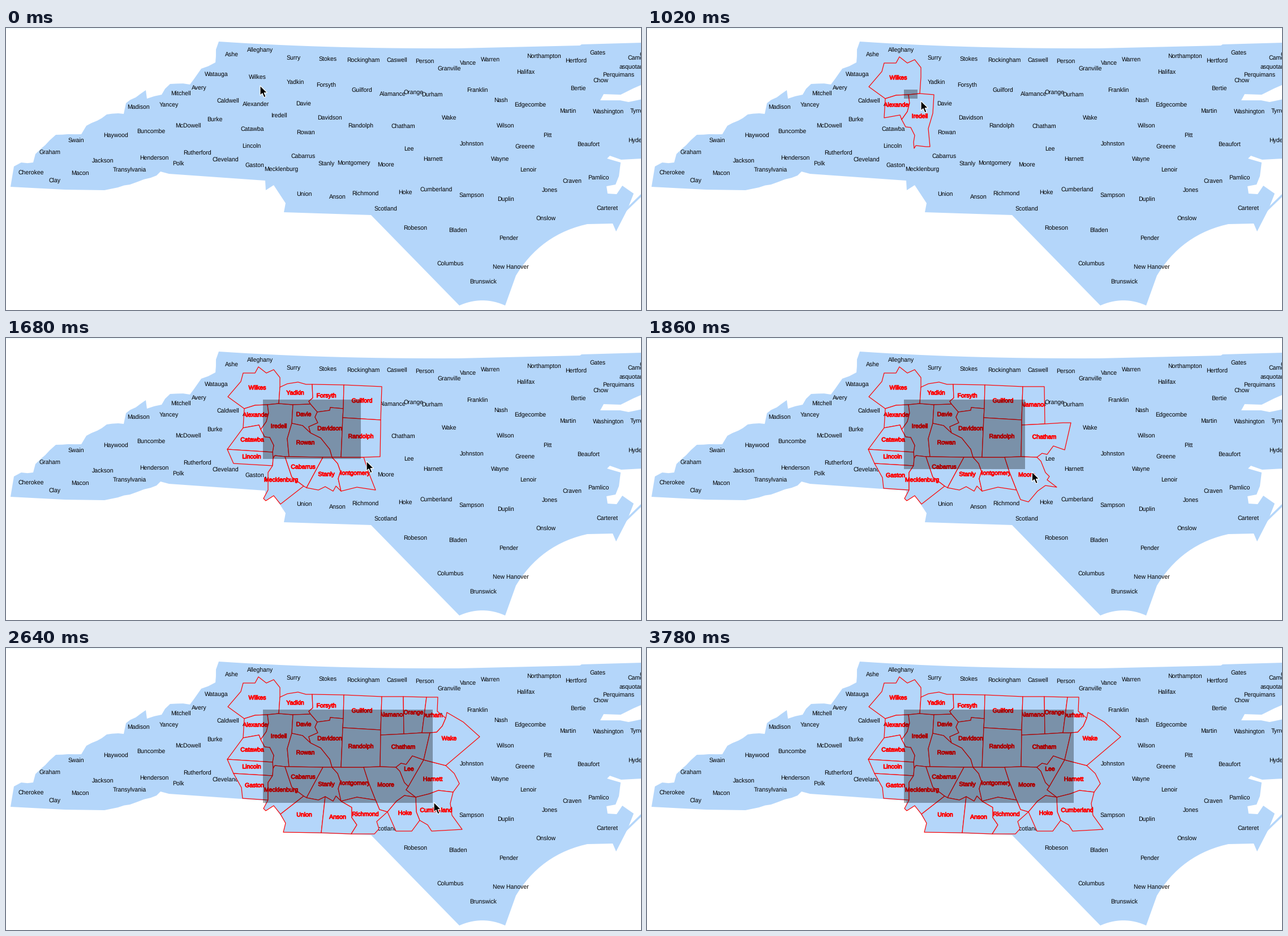
These frames come from a looping animation (1122x499 px, 3840 ms). A matplotlib script:

```python
import numpy as np
import matplotlib.pyplot as plt
from matplotlib.animation import FuncAnimation
from matplotlib.patches import Polygon, Rectangle
from matplotlib.patheffects import withStroke

W, H, DPI = 1122, 499, 64
FRAMES, STEP = 64, 60
LAND, RED = "#b4d6fa", "red"

plt.rcParams["font.family"] = "Liberation Sans"
plt.rcParams["text.hinting"] = "none"

fig = plt.figure(figsize=(W / DPI, H / DPI), dpi=DPI, facecolor="white")
ax = fig.add_axes([0, 0, 1, 1])
ax.set_xlim(0, W)
ax.set_ylim(H, 0)
ax.axis("off")


def pt(px):
    return px * 72 / DPI


def rough(points, amp, seed):
    """Break a line into short pieces and shake them, keeping its corners."""
    rng = np.random.default_rng(seed)
    out = []
    for a, b in zip(np.array(points[:-1], float), np.array(points[1:], float)):
        n = max(1, int(np.hypot(*(b - a)) // 10))
        out.append(a)
        out += [a + (b - a) * k / n + rng.uniform(-amp, amp, 2)
                for k in range(1, n)]
    return out + [points[-1]]


def bend(a, ctrl, b, n=16):
    s = np.linspace(0, 1, n)[:, None]
    a, ctrl, b = map(np.array, (a, ctrl, b))
    return list((1 - s) ** 2 * a + 2 * s * (1 - s) * ctrl + s ** 2 * b)


# State outline, clockwise from the north-west corner
north = bend((376, 24), (570, 37), (800, 36)) + [(1014, 31), (1017, 29),
                                                 (1124, 26)]
sounds = [(1124, 100), (1108, 107), (1086, 118), (1056, 117), (1050, 128),
          (1085, 128), (1100, 131), (1124, 126), (1124, 231), (1087, 233),
          (1067, 226), (1062, 231), (1086, 238), (1083, 262), (1077, 277),
          (1061, 280), (1063, 293), (1079, 294), (1089, 279), (1109, 293),
          (1098, 321), (1078, 360), (1072, 346)]
bays = (bend((1027, 347), (945, 365), (901, 438))
        + bend((882, 491), (842, 473), (801, 491)))
south = [(645, 331), (491, 326), (494, 310), (473, 278), (459, 287),
         (458, 270), (288, 258), (273, 254)]
ridge = rough([(273, 254), (266, 261), (219, 277), (174, 287)], 1.5, 4)
west = rough([(14, 245), (27, 238), (48, 238), (52, 223), (88, 189),
              (133, 188), (142, 173), (178, 153), (208, 152), (212, 133),
              (247, 110), (249, 125), (275, 118), (290, 99), (325, 100),
              (345, 72), (370, 61), (371, 38)], 1.5, 7)
outline = north + sounds + bays + south + ridge + [(104, 286), (8, 281)] + west

ax.add_patch(Rectangle((0, 0), W, 2, fc="#f0fbff", lw=0))
ax.add_patch(Polygon(outline, fc=LAND, lw=0))
ax.add_patch(Polygon([(1124, 292), (1124, 297), (1096, 324), (1093, 322)],
                     fc=LAND, lw=0))

MOUNTAINS = {
    "Ashe": (399, 47), "Alleghany": (449, 39), "Watauga": (372, 81),
    "Avery": (341, 105), "Mitchell": (309, 116), "Yancey": (288, 135),
    "Madison": (234, 140), "Caldwell": (392, 129), "Burke": (369, 162),
    "McDowell": (322, 173), "Buncombe": (256, 183), "Haywood": (194, 190),
    "Swain": (124, 199), "Graham": (77, 220), "Cherokee": (44, 256),
    "Clay": (86, 270), "Macon": (131, 256), "Jackson": (171, 235),
    "Transylvania": (218, 251), "Henderson": (262, 230), "Polk": (304, 240),
    "Rutherford": (338, 221), "Cleveland": (388, 233)}
UPLANDS = {
    "Surry": (508, 52), "Stokes": (569, 55), "Rockingham": (631, 57),
    "Caswell": (691, 57), "Person": (740, 58), "Granville": (783, 72),
    "Vance": (816, 61), "Warren": (856, 55), "Franklin": (833, 110),
    "Nash": (874, 128), "Johnston": (823, 205), "Scotland": (671, 320),
    "Robeson": (723, 354), "Bladen": (798, 358), "Columbus": (785, 417),
    "Sampson": (823, 295), "Brunswick": (843, 449)}
TIDEWATER = {
    "Northampton": (951, 50), "Hertford": (1007, 58), "Gates": (1045, 43),
    "Currituck": (1140, 47), "Camd": (1112, 53), "asquotan": (1105, 68),
    "Perquimans": (1082, 83), "Chow": (1051, 93), "Halifax": (918, 78),
    "Bertie": (1011, 107), "Edgecombe": (926, 136), "Martin": (993, 147),
    "Washington": (1065, 148), "Tyrrell": (1117, 147), "Hyde": (1111, 199),
    "Wilson": (883, 173), "Pitt": (957, 190), "Greene": (917, 209),
    "Beaufort": (1029, 206), "Wayne": (873, 231), "Lenoir": (923, 251),
    "Craven": (1000, 270), "Pamlico": (1047, 265), "Jones": (961, 286),
    "Duplin": (883, 303), "Carteret": (1062, 318), "Onslow": (954, 337),
    "Pender": (888, 372), "New Hanover": (892, 422)}
SELECTABLE = {
    "Wilkes": (444, 87), "Alexander": (442, 135), "Iredell": (482, 155),
    "Catawba": (435, 179), "Lincoln": (434, 209), "Gaston": (439, 242),
    "Mecklenburg": (486, 250), "Yadkin": (511, 96), "Forsyth": (566, 101),
    "Davie": (526, 134), "Davidson": (572, 159), "Rowan": (529, 184),
    "Cabarrus": (525, 227), "Stanly": (566, 240), "Montgomery": (614, 238),
    "Guilford": (629, 110), "Randolph": (627, 173), "Alamance": (683, 117),
    "Orange": (720, 113), "Chatham": (702, 174), "Moore": (671, 241),
    "Lee": (712, 213), "Harnett": (754, 231), "Cumberland": (760, 286),
    "Durham": (753, 118), "Wake": (783, 159), "Union": (527, 294),
    "Anson": (586, 298), "Richmond": (635, 293), "Hoke": (705, 291)}

corners = {name: [] for name in SELECTABLE}


def border(names, *points):
    """Give every named county these corners."""
    for name in names.split():
        corners[name] += points


border("Wilkes", (392, 104), (415, 77), (419, 62), (440, 62), (446, 51),
       (460, 62), (473, 56), (484, 70))
border("Wilkes Yadkin", (484, 87))
border("Wilkes Alexander", (421, 125), (440, 119))
border("Wilkes Alexander Iredell", (462, 118))
border("Wilkes Yadkin Iredell", (482, 116))
border("Alexander Iredell", (464, 133), (460, 148))
border("Alexander Iredell Catawba", (450, 162))
border("Alexander Catawba", (419, 159), (447, 154))
border("Iredell Catawba", (457, 175), (466, 176), (473, 190))
border("Iredell Catawba Lincoln", (471, 202))
border("Catawba Lincoln", (391, 197))
border("Iredell Lincoln Mecklenburg", (472, 213))
border("Lincoln Gaston", (402, 222))
border("Lincoln Gaston Mecklenburg", (471, 226))
border("Gaston", (418, 266), (416, 247))
border("Gaston Mecklenburg", (463, 238), (463, 269))
border("Mecklenburg", (455, 284), (459, 288), (473, 279))
border("Mecklenburg Union", (485, 294))
border("Iredell Mecklenburg", (475, 208))
border("Iredell Mecklenburg Cabarrus", (493, 210))
border("Iredell Rowan Cabarrus", (500, 210))
border("Iredell Rowan", (497, 178))
border("Iredell Rowan Davie", (505, 151))
border("Iredell Yadkin Davie", (507, 118))
border("Yadkin", (497, 81), (516, 78), (530, 82))
border("Yadkin Forsyth", (541, 82), (542, 106), (535, 112))
border("Yadkin Forsyth Davie", (538, 117))
border("Forsyth Davie Davidson", (550, 131))
border("Forsyth Davidson", (572, 128), (573, 123))
border("Forsyth Guilford", (597, 83))
border("Forsyth Guilford Davidson", (596, 125))
border("Davie Davidson", (546, 140), (551, 150), (535, 157))
border("Davie Davidson Rowan", (538, 168))
border("Davie Rowan", (524, 155))
border("Davidson Rowan", (556, 177), (572, 197))
border("Davidson Rowan Stanly Montgomery", (576, 211))
border("Rowan Cabarrus Stanly", (560, 211))
border("Davidson Randolph Montgomery", (592, 211))
border("Davidson Guilford Randolph", (595, 141))
border("Cabarrus Mecklenburg", (499, 228), (505, 246))
border("Cabarrus Mecklenburg Union", (526, 262))
border("Cabarrus Union Stanly", (531, 265))
border("Stanly Union", (552, 269))
border("Stanly Union Anson", (564, 263))
border("Stanly Anson", (578, 271), (583, 262))
border("Stanly Anson Montgomery Richmond", (592, 271))
border("Stanly Montgomery", (586, 222), (591, 236), (587, 249))
border("Montgomery Randolph Moore", (632, 211))
border("Montgomery Moore", (640, 236))
border("Montgomery Moore Richmond", (653, 269))
border("Montgomery Richmond", (620, 264))
border("Moore Richmond", (660, 286))
border("Moore Richmond Hoke", (674, 290))
border("Moore Hoke", (690, 271), (704, 261))
border("Moore Harnett Cumberland Hoke", (724, 264))
border("Guilford Alamance", (664, 86))
border("Guilford Randolph Alamance", (662, 145))
border("Randolph Alamance Chatham", (662, 154))
border("Randolph Chatham Moore", (661, 210))
border("Alamance Orange", (702, 86))
border("Alamance Chatham Orange", (703, 152))
border("Orange Chatham Durham", (735, 150))
border("Orange Durham", (743, 87))
border("Durham", (763, 87), (762, 112))
border("Durham Wake", (777, 124), (771, 138), (761, 149))
border("Chatham Durham Wake", (749, 150))
border("Wake", (779, 114), (808, 131), (837, 157))
border("Wake Harnett", (777, 208))
border("Chatham Wake Harnett Lee", (738, 198))
border("Chatham Lee", (718, 191), (707, 206), (698, 204))
border("Chatham Lee Moore", (689, 211))
border("Lee Moore", (696, 218), (704, 238))
border("Lee Moore Harnett", (711, 245))
border("Moore Harnett", (707, 251))
border("Harnett", (792, 222), (801, 240))
border("Harnett Cumberland", (748, 258), (764, 252), (790, 255))
border("Cumberland", (785, 275), (788, 296), (806, 321), (752, 324),
       (745, 313))
border("Cumberland Hoke", (725, 290), (731, 305))
border("Hoke", (717, 324), (689, 324))
border("Richmond", (655, 307), (659, 320), (651, 329))
border("Anson Richmond", (611, 282), (611, 300), (620, 313), (610, 329))
border("Anson Union", (557, 327))
border("Union", (490, 326), (494, 310))


def label(name, x, y, color="black", z=2):
    return ax.text(x, y + 4.2, name, ha="center", va="baseline",
                   size=pt(10.5), color=color, zorder=z)


for group in (MOUNTAINS, UPLANDS, TIDEWATER):
    for name, place in group.items():
        label(name, *place)

# Names too wide for their county, cut at its border
TIGHT = {"Alexander", "Alamance", "Durham", "Montgomery", "Cumberland"}
counties = []
for name, place in SELECTABLE.items():
    pts = np.array(corners[name], float)
    dx, dy = (pts - place).T
    pts = pts[np.argsort(np.arctan2(dy, dx))]
    shape = ax.add_patch(Polygon(pts, fc=LAND, ec=RED, lw=pt(1.2),
                                 joinstyle="round", zorder=3))
    plain, hot = label(name, *place), label(name, *place, RED, 4)
    hot.set_path_effects([withStroke(linewidth=pt(1), foreground=RED)])
    if name in TIGHT:
        for text in (plain, hot):
            text.set_clip_path(shape)
            text.set_clip_on(text is plain or name != "Cumberland")
    counties.append((shape, hot, pts.min(axis=0), pts.max(axis=0)))

band = ax.add_patch(Rectangle((0, 0), 0, 0, fc="black", alpha=0.32, lw=0,
                              zorder=5))
ARROW = 1.05 * np.array([(0, 0), (0, 16.5), (3.8, 13), (6.6, 19.8),
                         (9.6, 18.5), (6.8, 12), (12, 12)])
arrow = ax.add_patch(Polygon(ARROW, fc="black", ec="white", lw=pt(1.2),
                             joinstyle="miter", zorder=6))

# Pointer path: time, x, y; the band trails the pointer by LAG
PATH = np.array([(420, 449, 102), (780, 454, 109), (1020, 484, 129),
                 (1440, 590, 199), (1680, 637, 218), (2100, 738, 262),
                 (2280, 754, 274), (2580, 754, 274), (2640, 756, 273),
                 (3180, 800, 505)])
PRESS, RELEASE, LAG = 780, 2580, 50


def pointer(t):
    return np.array([np.interp(t, PATH[:, 0], PATH[:, k]) for k in (1, 2)])


def draw(i):
    t = i * STEP
    start = pointer(PRESS)
    end = pointer(min(t - LAG, RELEASE))
    dragging = t - LAG > PRESS
    band.set_visible(dragging)
    band.set_bounds(*start, *(end - start))
    for shape, hot, low, high in counties:
        hit = bool(dragging and np.all(low <= end) and np.all(high >= start))
        shape.set_visible(hit)
        hot.set_visible(hit)
    arrow.set_xy(ARROW + pointer(t))
    return []


anim = FuncAnimation(fig, draw, frames=FRAMES, interval=STEP,
                     init_func=lambda: draw(0), repeat=True, repeat_delay=0,
                     blit=False)
plt.show()
```
